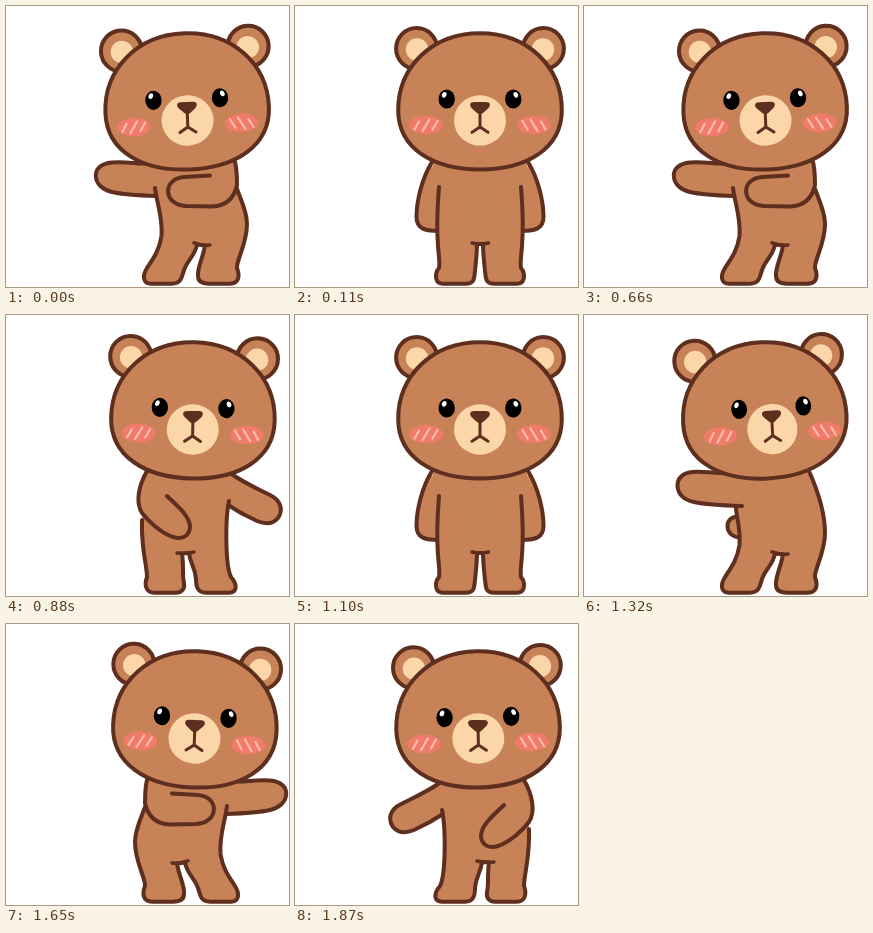
These frames come from a looping animation (283x281 px, 1980 ms). An HTML page:

```html
<!DOCTYPE html>
<html lang="en">
<head>
<meta charset="utf-8">
<title>Dancing bear</title>
<style>
  html, body { margin: 0; width: 100%; height: 100%; overflow: hidden; background: #fff; }
  svg { display: block; }
  .line { fill: none; stroke: #5e2e1e; stroke-width: 3.5; stroke-linecap: round; stroke-linejoin: round; }
  .limb { fill: #c78257; stroke-width: 4; }
  .fur { fill: #c78257; }
  .cream { fill: #fad6a8; }
  .dark { fill: #5e2e1e; }
  .blush { fill: #f17b69; }
  .shine { fill: none; stroke: #fdb9a9; stroke-width: 2.3; stroke-linecap: round; }
</style>
</head>
<body>
<svg id="stage" width="283" height="281" viewBox="0 0 283 281"></svg>
<script>
const STEP = 110;
const AXIS = 185;
const stage = document.getElementById('stage');

const limb = d => `<path class="line limb" d="${d}"/>`;
const line = d => `<path class="line" d="${d}"/>`;
const patch = points => `<polygon class="fur" points="${points}"/>`;
const flip = art => `<g transform="translate(${2 * AXIS} 0) scale(-1 1)">${art}</g>`;
const both = art => art + flip(art);

const ear = `
  <circle class="line limb" cx="121.6" cy="42.6" r="20.5"/>
  <circle class="cream" cx="122" cy="43.5" r="11.2"/>`;

const cheekAndEye = `
  <ellipse class="blush" cx="131" cy="119" rx="17" ry="9.3"/>
  <path class="shine" d="M119.5 123.5l4.5-8M127.5 125l7-11.5M137.5 123.5l5-8.5"/>
  <ellipse cx="151.7" cy="93" rx="8.2" ry="9.6"/>
  <ellipse fill="#fff" cx="149.2" cy="88.8" rx="2.2" ry="2.9" transform="rotate(25 149.2 88.8)"/>`;

const skull = limb('M185 27.2C233 27.2 266.8 61 266.8 104C266.8 143 231 163.5 185 163.5C139 163.5 103.2 143 103.2 104C103.2 61 137 27.2 185 27.2Z');

const muzzle = `
  <ellipse class="cream" cx="185" cy="114.5" rx="26" ry="25.2"/>
  <path class="dark" d="M179 96H191C195 96 196 99 193.5 102L188 107C186 108.5 184 108.5 182 107L176.5 102C174 99 175 96 179 96Z"/>
  <path class="line" style="stroke-width:3" d="M185 106V121M177 126.3L185 121L193 126.3"/>`;

// shift and tilt move the whole head; turn slides and narrows the face
function head(shift, tilt, turn) {
  const narrow = 1 - turn * 0.005;
  const face = `translate(${AXIS + turn} 0) scale(${narrow} 1) translate(${-AXIS} 0)`;
  return `<g transform="translate(${shift} 0) rotate(${tilt} ${AXIS} 100)">
    <g transform="translate(${-turn * 0.5} 0)">${both(ear)}</g>
    ${skull}
    <g transform="${face}">${both(cheekAndEye)}${muzzle}</g>
  </g>`;
}

const wideLegs = `C151 198 157 212 155.5 230C153 246 146 254 141 262
  C136 270 137 277.7 145 277.7L166 277.7C176 277.5 176 270 178 264
  C182 253 189 250 191 238.5L199 239.5C197 252 191 262 192 270
  C192 276 197 277.7 203 277.7L224 277.7C233 277.5 234 270 231 262
  C230 255 241 238 241 218`;

const midTorso = `M147 186C150 200 150 215 149.5 232C149 247 148 256 145 262
  C138 270 139 277.7 147 277.7L170 277.7C179 277.5 180 271 180 264
  C181 252 186 248 187 238L194 238.5C192 252 194 260 192 268
  C191 275 195 277.7 200 277.7L222 277.7C230 277.7 232 270 229 262
  C229 250 235 235 234 205`;

const midArm = limb('M146 158C132 168 118 174 106 180C94 186 93 196 98 203C104 210 112 209 119 206C130 201 139 196 148 190');
const midHip = line('M182 237Q190 239 199 238');
const wideHip = line('M188 236.8Q196 239.8 204 239');

const poses = {
  stand:
    both(limb('M137 156C127 172 121.5 195 121.5 211C121.5 222 130 225.5 142 224.5')) +
    patch('139,152 231,152 236,180 234,222 136,222 134,180') +
    limb(`M144 181C143 195 141 215 143 240C144 252 145 258 144 262
      C139 268 140 277.7 148 277.7L171 277.7C180 277.7 179 272 180 265
      C181 255 182 247 182 238L188 238C188 247 189 255 190 265
      C191 272 190 277.7 199 277.7L222 277.7C230 277.7 231 268 226 262
      C225 258 226 252 227 240C229 215 227 195 226 181`) +
    line('M177 237Q185 239 193.5 237') +
    head(0, 0, 0),

  frontHalf:
    midArm + patch('146.5,152 230,152 234,206 149,190 142,188') + limb(midTorso) + midHip +
    limb('M209 181C200 190 187 200 186 211C186 221 194 225 203 222C215 218 228 206 234 198C241 187 237 170 229 156') +
    head(-2, -1.1, 0),

  front:
    limb('M146 157.8L136 157.5C126 157 116 155.5 106 156.5C95 157.5 89.5 163 89.8 170C90 178 97 184 106 186C119 189 134 189.5 150 190') +
    patch('142,152 229,152 231,190 152,188 140,180') +
    limb('M149 182' + wideLegs + 'C241 205 234 192 231 183') + wideHip +
    limb('M204 169.5L178 171C156 173 157 199 180 200L206 200.5C219 200 228 193 231 179C231 170 231 160 228 153') +
    head(-4, -2.2, 0),

  backHalf:
    midArm + patch('146.5,152 227,152 234,206 149,190 142,188') +
    limb(midTorso + 'C234 185 232 169 226 155') + midHip +
    head(-2.2, -1.5, 3.5),

  back:
    limb('M156 201.5C148 201 143.5 205 143.5 211C143.5 218 149 222 156 223') +
    patch('140,152 225,152 225,159 153,192') +
    limb('M152 190' + wideLegs + 'C241 196 233 174 225 156') + wideHip +
    limb('M147 159L137 158C127 158 118 156 108 157C98 158 93.3 164 93.5 171C94 180 101 185 110 187C124 190 141 190.5 158 191') +
    head(-4.4, -3, 7)
};

// each swing: stand, half way, full reach; "~" swings to the other side
const dance = [
  'front', 'stand', '~backHalf', '~back', 'stand', 'frontHalf',
  'front', 'stand', '~frontHalf', '~front', 'stand', 'backHalf',
  'back', 'stand', '~frontHalf', '~front', 'stand', 'frontHalf'
];

const draw = key => key[0] === '~' ? flip(poses[key.slice(1)]) : poses[key];

const groups = {};
for (const key of new Set(dance)) {
  const g = document.createElementNS('http://www.w3.org/2000/svg', 'g');
  g.innerHTML = draw(key);
  g.style.display = 'none';
  groups[key] = stage.appendChild(g);
}

const start = performance.now();
let shown = null;

function tick() {
  const elapsed = Math.max(0, performance.now() - start);
  const key = dance[Math.floor(elapsed / STEP) % dance.length];
  if (key !== shown) {
    if (shown) groups[shown].style.display = 'none';
    groups[key].style.display = '';
    shown = key;
  }
  requestAnimationFrame(tick);
}
tick();
</script>
</body>
</html>
```
